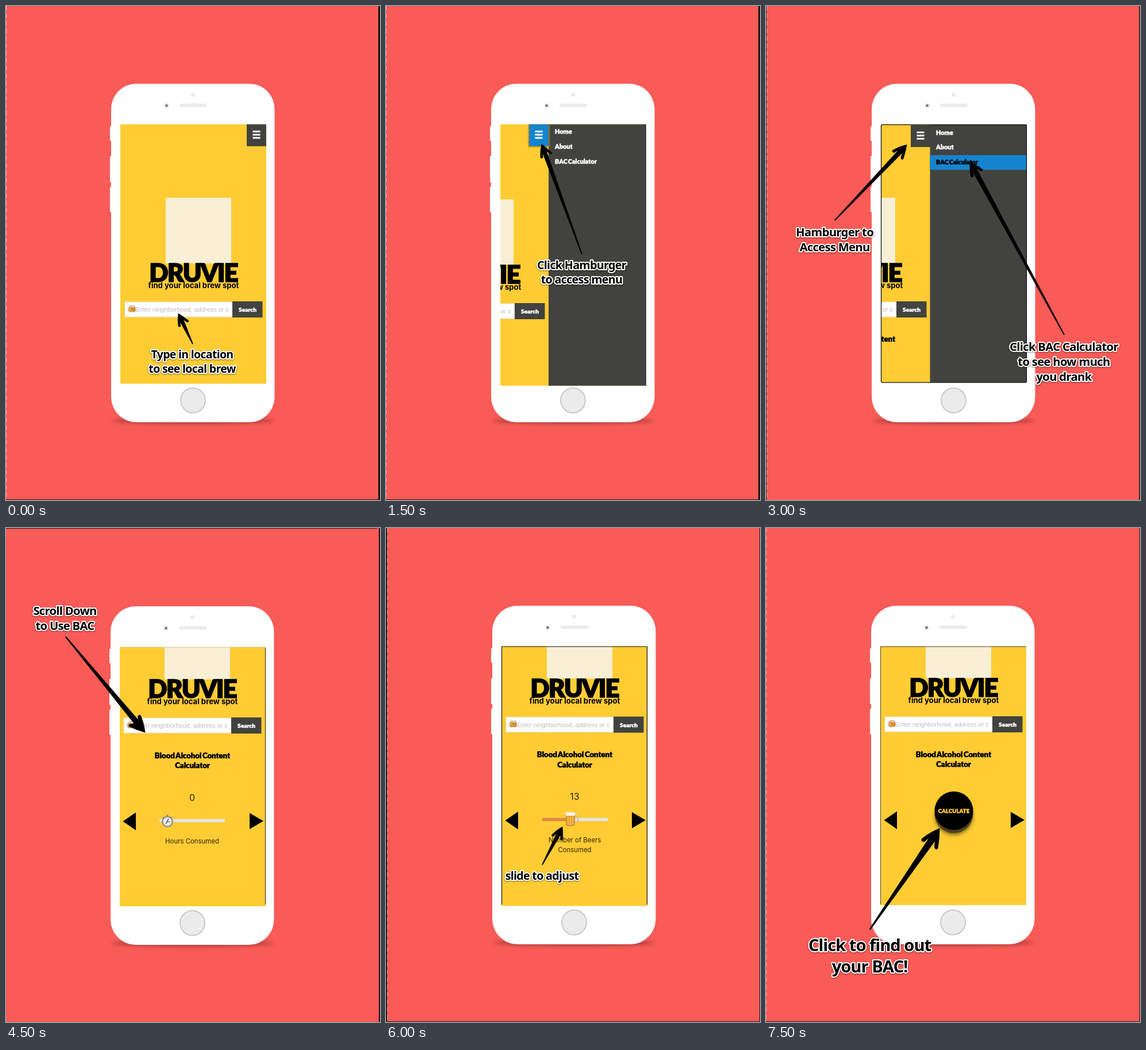
Write an HTML page that moves like this. It is 651 px wide and 858 px high and loops after 9000 ms.

```html
<!DOCTYPE html>
<html lang="en">
<head>
<meta charset="utf-8">
<title>Brew finder walkthrough</title>
<style>
html, body { margin: 0; width: 100%; height: 100%; overflow: hidden; background: #f95b57; }
#stage { display: block; width: 651px; height: 858px; }
.scene { visibility: hidden; animation: show 9s step-end infinite; }
@keyframes show {
  0% { visibility: visible; }
  16.66666%, 100% { visibility: hidden; }
}
.heavy { font-family: Lato, sans-serif; font-weight: 900; word-spacing: -1.5px; stroke-width: .5px; }
.brand { font-family: Lato, sans-serif; font-weight: 900; font-kerning: none; }
.plain { font-family: Inter, sans-serif; font-size: 11.4px; fill: #2c2410; }
.mid { text-anchor: middle; }
.note {
  font-family: "Noto Sans", sans-serif; font-weight: 700; text-anchor: middle; letter-spacing: -.035em;
  paint-order: stroke; stroke: #fff; stroke-width: 4px; stroke-linejoin: round;
  filter: drop-shadow(0 1px 1px rgba(0, 0, 0, .45));
}
</style>
</head>
<body>
<svg id="stage" viewBox="0 0 651 858">
  <defs>
    <filter id="soft" x="-20%" y="-100%" width="140%" height="300%"><feGaussianBlur stdDeviation="3"/></filter>

    <g id="phone">
      <ellipse cx="325.500" cy="720.500" rx="141" ry="5.500" opacity=".3" filter="url(#soft)"/>
      <g fill="#fff">
        <rect x="183" y="135" width="284.500" height="588" rx="44"/>
        <rect x="181" y="209" width="4" height="25" rx="1"/>
        <rect x="181" y="261" width="4" height="45" rx="1"/>
        <rect x="181" y="314" width="4" height="44" rx="1"/>
      </g>
      <g fill="#ebebeb">
        <circle cx="325.500" cy="154" r="3.500"/>
        <rect x="302" y="169.500" width="48" height="6" rx="3"/>
        <circle cx="279.500" cy="173" r="4.500"/>
        <circle cx="325.500" cy="685" r="21.500" stroke="#c9c9c9" stroke-width="2"/>
      </g>
      <circle cx="279.500" cy="173" r="2.300" fill="#757575"/>
    </g>

    <g id="cheers" stroke="#9a6224" stroke-width=".6">
      <g transform="rotate(12 216 527)">
        <rect x="212.500" y="523" width="3" height="6" rx="1.500" fill="none"/>
        <rect x="214.500" y="522" width="5" height="9" rx="1" fill="#efa72e"/>
        <rect x="214" y="520.500" width="6" height="3" rx="1.500" fill="#fff3d6"/>
      </g>
      <g transform="rotate(-12 222 527)">
        <rect x="222.500" y="523" width="3" height="6" rx="1.500" fill="none"/>
        <rect x="219.500" y="522" width="5" height="9" rx="1" fill="#e2902a"/>
        <rect x="219" y="520.500" width="6" height="3" rx="1.500" fill="#fff3d6"/>
      </g>
    </g>

    <g id="page">
      <rect x="-100" y="0" width="900" height="1300" fill="#ffcc33"/>
      <rect x="278" y="333" width="114" height="114" fill="#f8efd5"/>
      <text class="brand mid" x="326" y="479" font-size="44" letter-spacing="-2" stroke="#000" stroke-width="1.500">DRUVIE</text>
      <text class="mid" x="326.500" y="490" font-family="Inter, sans-serif" font-weight="700" font-size="13.100">find your local brew spot</text>
      <rect x="207" y="514" width="187" height="26" fill="#fff" stroke="#e6e0cc"/>
      <use href="#cheers"/>
      <text x="226" y="531" font-family="'Liberation Sans', Arial, sans-serif" font-size="10.900" fill="#bdbdbd">Enter neighborhood, address or c</text>
      <rect x="394" y="513" width="52.500" height="28" fill="#42433e"/>
      <text class="heavy mid" x="420.500" y="531" font-size="10.200" fill="#fff" stroke="#fff">Search</text>
    </g>

    <g id="title" class="heavy mid" font-size="13.200" stroke="#000">
      <text x="326.500" y="583.500">Blood Alcohol Content</text>
      <text x="326.500" y="601">Calculator</text>
    </g>
    <path id="pager" d="M205.500 693.500l22.500-15.500v31zM426 679l24 14-24 14z"/>

    <g id="burger">
      <rect width="34" height="38"/>
      <path d="M10.500 12.500h13M10.500 18h13M10.500 23.500h13" stroke="#fff" stroke-width="2.800"/>
    </g>

    <g id="stopwatch">
      <path d="M-1.500-12h3v4h-3zM6-9l3 3-2 1-2-2zM-6-9l-3 3 2 1 2-2z" fill="#8b8b8b"/>
      <circle r="8.800" fill="#f3f1ec" stroke="#858585" stroke-width="2"/>
      <circle r="6.500" fill="none" stroke="#888" stroke-dasharray="1 2.400"/>
      <path d="M-3 4L2-5M-1 0h5" stroke="#333" stroke-width="1.200"/>
    </g>

    <g id="beer">
      <path d="M6-6h3q3 0 3 3v5q0 4-6 5" fill="none" stroke="#d9c49a" stroke-width="2.400"/>
      <path d="M-9-8H7L6 11q-7 3-14 0z" fill="#e59a2b" stroke="#b98a48"/>
      <path d="M-5-3v13M-1-3v14M3-3v13" stroke="#f8c65b" stroke-width="1.800"/>
      <rect x="-10" y="-12" width="18" height="7" rx="3.500" fill="#fff4dc" stroke="#d9bd86" stroke-width=".7"/>
    </g>
  </defs>
</svg>
<script>
const DARK = '#42433e', BLUE = '#1584cf', EDGE = '#1d1517';

const rect = (x, y, w, h, fill, extra = '') =>
  `<rect x="${x}" y="${y}" width="${w}" height="${h}" fill="${fill}" ${extra}/>`;
const use = (id, x = 0, y = 0, extra = '') => `<use href="#${id}" x="${x}" y="${y}" ${extra}/>`;
const text = (x, y, value, attrs) => `<text x="${x}" y="${y}" ${attrs}>${value}</text>`;
const dashes = x =>
  `<path d="M${x} 0V858" stroke="#fff" stroke-opacity=".55" stroke-dasharray="8 5"/>`;

// A clipped window onto the app page, scrolled by (dx, dy).
const view = (x, y, w, h, dx, dy, extra = '') =>
  `<svg x="${x}" y="${y}" width="${w}" height="${h}" viewBox="${x - dx} ${y - dy} ${w} ${h}">${use('page')}${extra}</svg>`;

const note = (x, y, lines, size, gap) => lines
  .map((line, i) => text(x, y + i * gap, line, `class="note" font-size="${size}"`)).join('');

// Tapered hand-drawn arrow; notch tells how deep the head is cut at the back.
function arrow(x1, y1, x2, y2, size, notch = 21) {
  const length = Math.hypot(x2 - x1, y2 - y1) / size;
  const angle = Math.atan2(y2 - y1, x2 - x1) * 180 / Math.PI;
  return `<path transform="translate(${x2} ${y2}) rotate(${angle}) scale(${size})"
    stroke="#000" stroke-width="1" stroke-linejoin="round"
    d="M0 0Q-15-10-32-15Q-37-14-34-9L${-notch}-5.5L${-length}-.8V.8L${-notch} 5.5L-31 11Q-35 16-30 17Q-15 10 0 0Z"/>`;
}

const menu = (x, y, gap, active) => ['Home', 'About', 'BAC Calculator'].map((item, i) => {
  const color = i === active ? '#000' : '#fff';
  return text(x, y + i * gap, item, `class="heavy" font-size="10.900" fill="${color}" stroke="${color}"`);
}).join('');

const slider = (x, y, value) =>
  rect(x, y, 114, 5.5, '#e4e4e4', 'rx="1"') + rect(x, y, value, 5.5, '#e08a3c');
const count = (x, y, value) =>
  text(x, y, value, 'class="plain mid" style="font-size:16px"');
const label = (x, y, value) => text(x, y, value, 'class="plain mid"');

const calculator = use('title') + use('pager');

const scenes = [
  dashes(.5) + rect(648, 0, 3, 858, EDGE) + rect(0, 857, 651, 1, EDGE) + use('phone')
    + view(199, 205.5, 254, 450.5, 0, 0)
    + use('burger', 419, 205.5, `fill="${DARK}"`)
    + arrow(325, 587, 300, 534, .63)
    + note(324, 612, ['Type in location', 'to see local brew'], 19.5, 25),

  dashes(.5) + rect(648, 0, 3, 858, EDGE) + rect(0, 857, 651, 1, EDGE) + use('phone')
    + view(199, 205.5, 254, 454, -170, 3)
    + rect(247, 205.5, 39, 40, '#dc9a0c')
    + rect(283, 205.5, 170, 454, DARK)
    + rect(283, 205.5, 2.5, 40, '#8a6618')
    + use('burger', 249, 205.5, `fill="${BLUE}"`)
    + menu(294, 222, 26)
    + arrow(341, 431, 271, 240, .66)
    + note(340.5, 457, ['Click Hamburger', 'to access menu'], 19.7, 25),

  rect(0, 0, 1, 858, EDGE) + dashes(1.5) + rect(649.5, 0, 1.5, 858, EDGE) + use('phone', 1)
    + view(200, 206, 254, 448, -167, 0, use('title', 0, -1))
    + rect(285.5, 206, 168, 448, DARK)
    + use('burger', 252, 207, `fill="${DARK}"`)
    + rect(285.5, 259, 168, 25.5, BLUE)
    + menu(296, 223.5, 25.7, 2)
    + rect(200.5, 206.2, 253, 447.6, 'none', 'rx="1.500" stroke="#111" stroke-width="1.300"')
    + arrow(120, 372, 245, 241, .74)
    + arrow(519, 571, 355, 270, .74)
    + note(119.5, 400, ['Hamburger to', 'Access Menu'], 20.3, 26)
    + note(518.5, 599, ['Click BAC Calculator', 'to see how much', 'you drank'], 20.3, 26),

  rect(0, 0, 646, 1, EDGE) + rect(649, 0, 2, 858, EDGE) + use('phone', -1, 1)
    + view(198, 207, 254, 450, -2, -184, calculator)
    + rect(198, 206.5, 254, 1, '#d8c48a') + rect(451, 208, 1, 446, '#222')
    + count(324, 474, '0') + slider(267, 505.5, 0) + use('stopwatch', 281, 510)
    + label(324, 547.5, 'Hours Consumed')
    + arrow(104, 189, 242, 355, .85, 28)
    + note(102.5, 151, ['Scroll Down', 'to Use BAC'], 20.2, 26),

  rect(0, 0, 2, 858, EDGE) + dashes(2.5) + rect(650, 0, 1, 858, EDGE) + rect(0, 857, 651, 1, EDGE)
    + use('phone', 2)
    + view(201, 205.5, 254, 451, 2, -185.5, calculator)
    + '<path d="M201.500 654V206H454.500V654" fill="none" stroke="#111" stroke-width="1.200"/>'
    + count(328.5, 472, '13') + slider(272, 503.5, 48) + use('beer', 322, 505)
    + label(328.5, 545.5, 'Number of Beers') + label(328.5, 562.5, 'Consumed')
    + arrow(272, 585, 307, 519, .65)
    + note(271.5, 611, ['slide to adjust'], 19.6, 25),

  dashes(.5) + rect(650, 0, 1, 858, EDGE) + rect(0, 857, 651, 1, EDGE) + use('phone')
    + view(199, 205.5, 254, 449.5, 0, -186, calculator)
    + '<path d="M199.500 654V206H453" fill="none" stroke="#4a4638"/>'
    + '<circle cx="327" cy="500" r="33" opacity=".5" filter="url(#soft)"/>'
    + '<circle cx="327" cy="496.500" r="33.500" fill="#51431c"/><circle cx="327" cy="491" r="33.500"/>'
    + text(327, 494.5, 'CALCULATE', 'class="heavy mid" font-size="9.700" fill="#ffcc33" stroke="#ffcc33"')
    + arrow(181, 697, 302, 522, 1)
    + note(180.5, 735, ['Click to find out', 'your BAC!'], 29.2, 37)
];

document.getElementById('stage').insertAdjacentHTML('beforeend', scenes.map((content, i) =>
  `<g class="scene" style="animation-delay:${i * 1.5 - 9}s">${content}</g>`).join(''));
</script>
</body>
</html>
```
